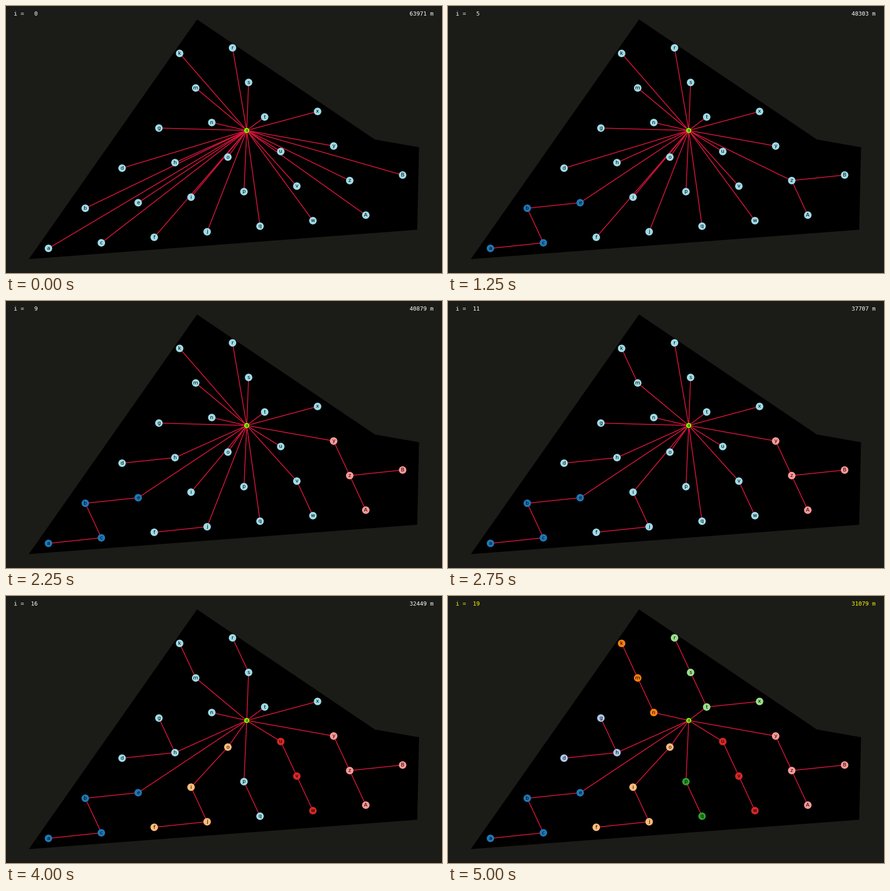
These frames come from a looping animation (955x586 px, 5250 ms). A matplotlib script:

```python
import matplotlib.pyplot as plt
from matplotlib.animation import FuncAnimation
from matplotlib.patches import Circle, Polygon

W, H, DPI = 955, 586, 100
STEP_MS = 250
BACK, EDGE, IDLE, ROOT_COLOR = "#1b1c17", "crimson", "#9edae5", "#7fff00"
ROOT = (527.3, 273.2)
AREA = [(418.5, 29.5), (808, 293), (904.7, 310), (900.7, 491), (50, 555.5)]

# Sites sit on a skewed grid: each column is listed from top to bottom.
COLUMNS = ["a", "bc", "def", "ghij", "kmnopq", "rstuvw", "xyzA", "B "]
ACROSS, DOWN = (115.85, -12.15), (35.22, 75.85)

# Each merge drops the first site's link to the centre and joins it to the second.
MERGES = "ac cb be Bz Az fj dh zy wv ji km qp gh rs vu io mn xt st".split()
TOTALS = [63971, 59797, 56370, 53404, 50843, 48303, 46225, 44409, 42613, 40879,
          39215, 37707, 36325, 35157, 34076, 33212, 32449, 31783, 31311, 31079]
# Finished groups: members, step at which they close; colours follow tab20.
GROUPS = [("abce", 3), ("dgh", 18), ("kmn", 18), ("fijo", 16),
          ("pq", 17), ("rstx", 19), ("uvw", 16), ("yzAB", 8)]


def site_positions():
    sites = {}
    for col, names in enumerate(COLUMNS):
        for row, name in enumerate(reversed(names)):
            if name != " ":
                sites[name] = (93 + col * ACROSS[0] - row * DOWN[0],
                               531.9 + col * ACROSS[1] - row * DOWN[1])
    return sites


fig = plt.figure(figsize=(W / DPI, H / DPI), dpi=DPI, facecolor=BACK)
ax = fig.add_axes([0, 0, 1, 1])
ax.set_xlim(0, W)
ax.set_ylim(H, 0)
ax.axis("off")
ax.add_patch(Polygon(AREA, color="black", lw=0, zorder=0))


def add_node(pos, name, radius, color, size, z):
    dot = ax.add_patch(Circle(pos, radius, fc=color, ec="none", zorder=z))
    ax.text(*pos, name, size=size, family="DejaVu Sans", color="black",
            ha="center", va="center", zorder=z + 1)
    return dot


sites = site_positions()
links = {n: ax.plot([], [], color=EDGE, lw=1.3, zorder=1)[0] for n in sites}
dots = {n: add_node(p, n, 8.2, IDLE, 8, 2) for n, p in sites.items()}
add_node(ROOT, "α", 5.6, ROOT_COLOR, 6, 4)

mono = dict(size=9, family="DejaVu Sans Mono", va="baseline")
step_text = ax.text(17, 21, "", ha="left", **mono)
total_text = ax.text(936, 21, "", ha="right", **mono)
tab20 = plt.get_cmap("tab20")


def draw(frame):
    step = min(frame, len(MERGES))
    joined = dict(MERGES[:step])
    for name, (x, y) in sites.items():
        ex, ey = sites[joined[name]] if name in joined else ROOT
        links[name].set_data([x, ex], [y, ey])
    for k, (members, closed) in enumerate(GROUPS):
        for name in members:
            dots[name].set_facecolor(tab20(k) if step >= closed else IDLE)
    color = "yellow" if frame > len(MERGES) else "white"
    step_text.set_text(f"i = {step:3d}")
    total_text.set_text(f"{TOTALS[step]} m")
    step_text.set_color(color)
    total_text.set_color(color)
    return [*links.values(), *dots.values(), step_text, total_text]


anim = FuncAnimation(fig, draw, frames=len(MERGES) + 2, interval=STEP_MS,
                     repeat=True, repeat_delay=0, blit=False)
plt.show()
```
